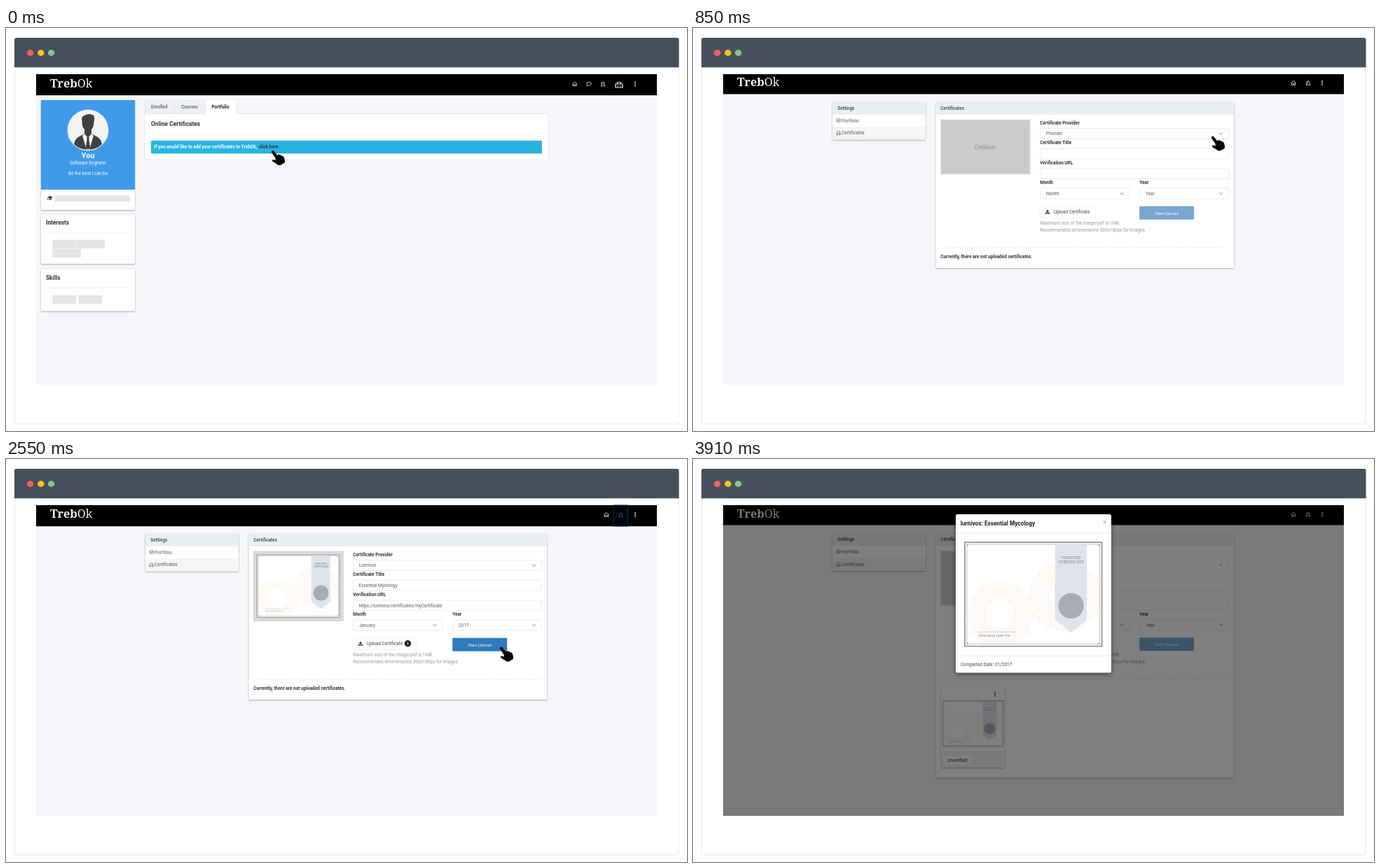
An HTML page that plays this animation: 972 by 576 pixels, repeating every 4.25 s.

```html
<!DOCTYPE html>
<html lang="en">
<head>
<meta charset="utf-8">
<title>Adding a certificate</title>
<style>
html, body { margin: 0; width: 100%; height: 100%; overflow: hidden; background: #fff; }
#stage { display: block; width: 972px; height: 576px; }
</style>
</head>
<body>
<svg id="stage" viewBox="0 0 972 576" xmlns="http://www.w3.org/2000/svg"></svg>
<script>
const stage = document.getElementById('stage');
const STEP = 850;
const PROVIDERS = ['Provider', 'Tovaly', 'Ploven', 'Lurnivos', 'Ozq', 'Mellow Study',
  'Drel College', 'Calm Teaching', 'Quoriln', 'Zemlo'];
const COURSE = 'Essential Mycology';
const INK = '#303338', GREY = '#555b62', EDGE = '#e4e7eb';

let markup = '';

const attributes = list => Object.entries(list).map(([k, v]) => `${k}="${v}"`).join(' ');

function add(tag, list, content = '') {
  markup += `<${tag} ${attributes(list)}>${content}</${tag}>`;
}

function group(list, draw, tag = 'g') {
  markup += `<${tag} ${attributes(list)}>`;
  draw();
  markup += `</${tag}>`;
}

function box(x, y, width, height, fill = 'none', stroke = 'none', rx = 0, lw = 0.8) {
  add('rect', { x, y, width, height, rx, fill, stroke, 'stroke-width': lw });
}

function path(d, x, y, { fill = 'none', stroke = 'none', lw = 0.9, dash = 'none' }) {
  add('path', { d, transform: `translate(${x} ${y})`, fill, stroke, 'stroke-width': lw, 'stroke-dasharray': dash });
}

function roundedTop(x, y, w, h, fill, r) {
  path(`M0 ${h}V${r}Q0 0 ${r} 0H${w - r}Q${w} 0 ${w} ${r}V${h}Z`, x, y, { fill });
}

function text(s, x, y, { size = 6.45, weight = 400, color = GREY, align = 'start', family = 'Roboto, sans-serif', gap = 0 } = {}) {
  add('text', {
    x, y, 'font-size': size, 'font-weight': weight, 'font-family': family,
    fill: color, 'text-anchor': align, 'letter-spacing': gap
  }, s);
}

const bold = (s, x, y, size = 6.45, color = INK) => text(s, x, y, { size, weight: 700, color });

const rule = (x1, x2, y, color = '#e3e5e8', dash = 'none') =>
  path(`M${x1} ${y}H${x2}`, 0, 0, { stroke: color, lw: 0.8, dash });

const dot = (cx, cy, rx, fill, ry = rx) => add('ellipse', { cx, cy, rx, ry, fill });

const shadowed = (shadow, draw) => group({ style: `filter:drop-shadow(${shadow})` }, draw);

const card = (x, y, w, h) =>
  shadowed('0 1px 1px rgba(0,0,0,.33)', () => box(x, y, w, h, '#fff', 'none', 1.5));

function hand(x, y) {
  path('M0 2Q0 0 2 0Q3 .2 4 1.7L8.5 7Q10 5 12 6.5Q14 6 15 8Q17 7.6 18 10L19 14.5Q19.5 16.5 18 18L12.5 21Q9 21.5 7.5 19.5L2 16Q0 14.2 1.8 13.2Q3.5 13 6 14L5.3 10.5L.6 4Z', x, y, { fill: '#000' });
}

function menuDots(x, y, color) {
  for (const d of [-2.6, 0, 2.6]) dot(x, y + d, 0.95, color);
}

const homeIcon = (x, y) =>
  path('M-3.5 .3L0 -3L3.5 .3M-2.5 -.3V3H-.8V.8H.8V3H2.5V-.3', x, y, { stroke: '#ddd' });

const peopleIcon = (x, y, color = '#ddd') =>
  path('M-3 2.8H3.2M-2.8 2.5Q-2.7 .8 -.8 .4Q-2 -2.8 .6 -3Q3 -2.6 1.5 .3Q3 .8 2.8 2.5M-1.5 -2.2Q-3 -1.5 -2 .3', x, y, { stroke: color });

function windowFrame() {
  box(0, 0, 972, 576, '#fff');
  box(12.5, 14.5, 947.5, 551.5, '#fff', '#e6e7e9', 3, 1);
  roundedTop(12, 14, 948.5, 42.3, '#474e5d', 3);
  dot(34.6, 35.5, 4.8, '#ee6359', 4.4);
  dot(49.8, 35.5, 4.8, '#f8c411', 4.4);
  dot(64.6, 35.5, 4.8, '#82c87a', 4.4);
  box(43, 66, 886, 444, '#f5f6fa');
}

function navBar(height, baseline) {
  box(43, 66, 886, height, '#000');
  text('<tspan font-weight="700">Treb</tspan>Ok', 63, baseline,
    { size: 16.2, color: '#f2f2f2', family: 'Noto Serif, serif' });
}

function avatar() {
  const dark = { fill: '#3f4042' }, pale = { fill: '#f3f3f3' };
  dot(117, 146, 29.5, '#dfe3e7');
  dot(117, 146, 28.4, '#f3f3f3');
  path('M-20 20Q-18 12 -14 10L-5 5V-1Q-9 -5 -8.5 -13Q-10 -20 -5 -21Q2 -25 8 -21Q10 -18 8.5 -11Q8 -4 5 -1V5L14 10Q18 12 20 20A28.4 28.4 0 0 1 -20 20Z', 117, 146, dark);
  path('M-5 5L0 11L5 5L8 8L2 28H-2L-8 8Z', 117, 146, pale);
  path('M-2 10H2L1.3 13L3.2 25L0 28L-3.2 25L-1.3 13Z', 117, 146, dark);
}

function profile() {
  const white = { color: '#fff', align: 'middle' };
  card(50, 103, 134, 157);
  roundedTop(50, 103, 134, 128, '#3e9beb', 1);
  avatar();
  text('You', 117, 186, { ...white, size: 11, weight: 700 });
  text('Software Engineer', 117, 195, white);
  text('Be the best I can be', 117, 210, white);
  path('M-4 -1L0 -3L4 -1L0 1ZM-2 .6L0 1.7L2 .6V2.2Q0 3.4 -2 2.2ZM-3.5 -.5H-3V3H-3.8Z', 63, 243, { fill: '#333' });
  box(69, 239.5, 108, 8.5, '#e5e5e5');

  card(50, 267, 134, 70);
  bold('Interests', 57, 281.3, 8.3);
  rule(57, 177, 293);
  box(66.5, 302.5, 33.5, 12.5, '#e5e5e5');
  box(100.4, 302.5, 40.6, 12.5, '#e5e5e5');
  box(66.5, 315.6, 40.3, 12.5, '#e5e5e5');

  card(50, 345, 134, 59.5);
  bold('Skills', 57, 359.7, 8.3);
  rule(57, 177, 371.3);
  box(66.5, 382, 33.5, 12, '#e5e5e5');
  box(103.5, 382, 33.5, 12, '#e5e5e5');
}

function portfolioPage() {
  navBar(30.2, 85);
  homeIcon(811.7, 80);
  path('M-1.5 2L-2.8 3.2L-2.5 1.5Q-4 0 -3 -1.8Q0 -3.6 3 -1.6Q4 .4 2 1.8Q.5 2.4 -1.5 2Z', 832, 80, { stroke: '#ddd' });
  peopleIcon(852, 80);
  path('M-5 -1H5V4H-5ZM-2 -1L-3 -4M2 -1L3 -4M-1.5 -3.5H1.5M-3 2H-1M1 2H3', 875, 81, { stroke: '#eee', lw: 1.2 });
  menuDots(898, 80, '#eee');
  profile();

  box(198, 103, 43, 19.5, '#eef0f3', EDGE);
  box(241, 103, 43.5, 19.5, '#eef0f3', EDGE);
  box(198, 122.5, 576, 66, '#fff', EDGE);
  box(284.5, 103, 44.5, 20, '#fff', EDGE);
  box(284.9, 121, 43.7, 3, '#fff');
  bold('Enrolled', 207, 115.3, 6.35, '#6a7077');
  bold('Courses', 250.3, 115.3, 6.35, '#6a7077');
  bold('Portfolio', 293.5, 115.3, 6.35, '#222');
  bold('Online Certificates', 207, 139.6, 8.4);
  rule(207, 764, 151.5, '#dfe1e4', '1 1');
  box(207.4, 161.4, 557, 17.6, '#28b4e0', '#20a4d0', 0.5);
  bold('If you would like to add your certificates to TrebOk,', 211.3, 172.4, 6.45, '#fff');
  bold('click here', 360.7, 172.4, 6.45, '#173d4c');
  hand(379, 175);
}

function field(x, y, w, value, select) {
  box(x + 0.4, y, w - 0.8, 14.8, '#fff', EDGE, 1);
  if (value) text(value, x + (select ? 9 : 8.5), y + 9.9);
  if (select) path('M-2.5 -1.2L0 1.2L2.5 -1.2', x + w - 11.5, y + 7.5, { stroke: '#666', lw: 0.8 });
}

function rosette(x, y, r) {
  for (let ring = 0; ring < 7; ring++) {
    const radius = r * (1 - ring * 0.085), points = [];
    for (let i = 0; i < 96; i++) {
      const a = i * Math.PI / 48, d = radius * (1 + 0.045 * Math.cos(a * 24) + 0.02 * Math.cos(a * 12));
      points.push(`${(d * Math.cos(a)).toFixed(2)} ${(d * Math.sin(a)).toFixed(2)}`);
    }
    path(`M${points.join('L')}Z`, x, y, { stroke: '#f9eee6', lw: 1.1 });
  }
}

// Drawn on a 196 x 149 sheet, then scaled to the wanted width.
function certificate(x, y, width) {
  const serif = { family: 'Noto Serif, serif', color: '#596574' };
  group({ transform: `translate(${x} ${y}) scale(${width / 196})` }, () => {
    box(0, 0, 196, 149, '#fff', '#929292', 0, 1.7);
    group({ x: 3, y: 3, width: 190, height: 143, viewBox: '3 3 190 143' }, () => {
      rosette(50, 104, 46);
      rosette(144, 77, 50);
    }, 'svg');
    box(3, 3, 190, 143, 'none', '#b5b5b5');
    for (const cx of [4, 192]) for (const cy of [4, 145]) dot(cx, cy, 1.1, '#999');
    path('M129 3H174.5V111L152 129L129 111Z', 0, 0, { fill: '#dfe4ec' });
    text('VERIFIED', 152.3, 24, { ...serif, size: 5, align: 'middle', gap: 0.6 });
    text('CERTIFICATE', 152.3, 30.5, { ...serif, size: 5, align: 'middle', gap: 0.5 });
    dot(152, 91, 18.3, '#a8adb5');
    rule(20, 74, 128.5, '#777', '1 1.5');
    text('PROFESSOR TARN VEX', 20, 135, { ...serif, size: 3.7, gap: 0.25 });
  });
}

function sidebar() {
  card(199, 105, 133, 54.5);
  roundedTop(199, 105, 133, 18.7, '#eceff1', 1.5);
  bold('Settings', 206.3, 116.8, 6.45, '#50565d');
  box(199, 141, 133, 18.5, '#f5f5f5');
  path('M-2.8 -1.5L0 -2.8L2.8 -1.5L0 0ZM-2.8 -1.5V1.5L0 2.8L2.8 1.5V-1.5M-2.8 0L0 1.4L2.8 0', 207.6, 132, { stroke: '#666', lw: 0.6 });
  text('Portfolio', 212, 134.5);
  path('M-2 .8V-1.5Q0 -4 2 -1.5V.8M-2.8 .8H-.8V2.8H-2.8ZM.8 .8H2.8V2.8H.8Z', 207.6, 150, { stroke: '#666', lw: 0.7 });
  text('Certificates', 212, 152.4);
}

function uploadForm(height, filled) {
  card(346.5, 105, 425.5, height);
  roundedTop(346.5, 105, 425.5, 18.7, '#eceff1', 1.5);
  bold('Certificates', 353.3, 116.8, 6.45, '#50565d');
  if (filled) {
    box(353.3, 131, 128, 99.5, '#dadada', '#cfcfcf');
    certificate(358.4, 136, 117.5);
  } else {
    box(354, 131.3, 127, 77.4, '#cacaca', '#dcdcdc', 0, 1.5);
    text('Certificate', 417, 172.6, { size: 6.6, color: '#858585', align: 'middle', family: 'Lato, sans-serif' });
  }
  bold('Certificate Provider', 495.3, 138);
  field(495, 143.5, 270, filled ? PROVIDERS[3] : 'Provider', true);
  bold('Certificate Title', 495.3, 166.3);
  field(495, 172.2, 270, filled && COURSE);
  bold('Verification URL', 495.3, 195);
  field(495, 200.8, 270, filled && 'https://lurnivos/certificates/myCertificate');
  bold('Month', 495.3, 223.3);
  field(495, 229.1, 128.5, filled ? 'January' : 'Month', true);
  bold('Year', 637.2, 223.3);
  field(637, 229.1, 128, filled ? '2017' : 'Year', true);

  box(495.4, 254.6, filled ? 90.5 : 79, 16.6, '#fff', '#eceef0', 1);
  path('M0 -3L2.4 -.4H.8V1.4H-.8V-.4H-2.4ZM-3.3 1H-1.4V2H1.4V1H3.3V3H-3.3Z', 506, 262.8, { fill: '#333' });
  text('Upload Certificate', 515, 265.2, { color: '#41464c' });
  if (filled) {
    dot(573.4, 262.8, 4.7, '#222');
    text('1', 573.4, 265, { size: 6, weight: 700, color: '#fff', align: 'middle' });
  }
  box(637.2, 254.7, 78, 19, filled ? '#2f7abb' : '#78a7d0', 'none', 1);
  text('Start Upload', 676.2, 266.5, { size: 6, color: '#fff', align: 'middle' });
  text('Maximum size of the image/pdf is 1MB.', 495.3, 281.3, { color: '#929aa3' });
  text('Recommended dimmensions 300x180px for images.', 495.3, 291, { color: '#929aa3' });
  rule(353, 765, 314, '#e0e2e5', '1 .6');
}

function settingsPage({ shift, height = 238, filled = false, empty = true }) {
  navBar(filled ? 30.2 : 28.5, 83 + shift);
  if (filled) {
    box(867, 66, 20.5, 30, '#00060b', '#0b2c47', 0, 1);
    peopleIcon(877.3, 80, '#14588c');
  } else {
    peopleIcon(878, 78.5 + shift);
  }
  homeIcon(857, 78.5 + shift);
  menuDots(898, 78.5 + shift, '#eee');
  group({ transform: `translate(0 ${shift})` }, () => {
    sidebar();
    uploadForm(height, filled);
    if (empty) bold('Currently, there are not uploaded certificates.', 353.3, 329.3);
  });
}

function providerList() {
  box(495.6, 119.4, 269, 89, '#fff', '#222', 0, 1.2);
  box(496.2, 147.4, 267.8, 8.2, '#1f9de0');
  PROVIDERS.forEach((name, i) =>
    text(name, 504.3, 128.7 + i * 8.3, { color: i === 3 ? '#fff' : '#41464c' }));
}

function uploadedCard() {
  card(354, 326, 91, 115);
  menuDots(431, 336, '#333');
  certificate(356.8, 345.5, 86);
  box(354, 418.5, 91, 22.5, '#f5f6f7');
  rule(354, 445, 418.5);
  box(358.5, 424.5, 37.5, 12, '#fff', 'none', 1);
  text('Unverified', 363, 433, { color: '#222' });
}

function certificateDialog() {
  box(43, 66, 886, 444, 'rgba(0,0,0,.5)');
  shadowed('0 2px 3.5px rgba(0,0,0,.5)', () => box(375, 79, 222, 226.6, '#fff', 'none', 2.5));
  bold('lurnivos: ' + COURSE, 381.7, 95, 8.3, '#222');
  text('×', 587.7, 93, { size: 9, color: '#999', align: 'middle' });
  rule(375, 597, 105.6);
  certificate(388, 119, 195.5);
  rule(375, 597, 281.5);
  text('Completed Date: 01/2017', 381.7, 296, { color: '#444' });
}

const scenes = [
  portfolioPage,
  () => { settingsPage({ shift: 0 }); hand(740, 154.5); },
  () => { settingsPage({ shift: 0.4 }); providerList(); hand(740, 153); },
  () => { settingsPage({ shift: 1, filled: true }); hand(705, 268.5); },
  () => {
    settingsPage({ shift: 0.5, height: 350, empty: false });
    uploadedCard();
    certificateDialog();
  }
];

windowFrame();
scenes.forEach(draw => group({ class: 'scene', display: 'none' }, draw));
stage.innerHTML = markup;
const layers = stage.querySelectorAll('.scene');

function frame() {
  const current = Math.floor(performance.now() / STEP) % layers.length;
  layers.forEach((layer, i) => layer.setAttribute('display', i === current ? 'inline' : 'none'));
  requestAnimationFrame(frame);
}
frame();
</script>
</body>
</html>
```
